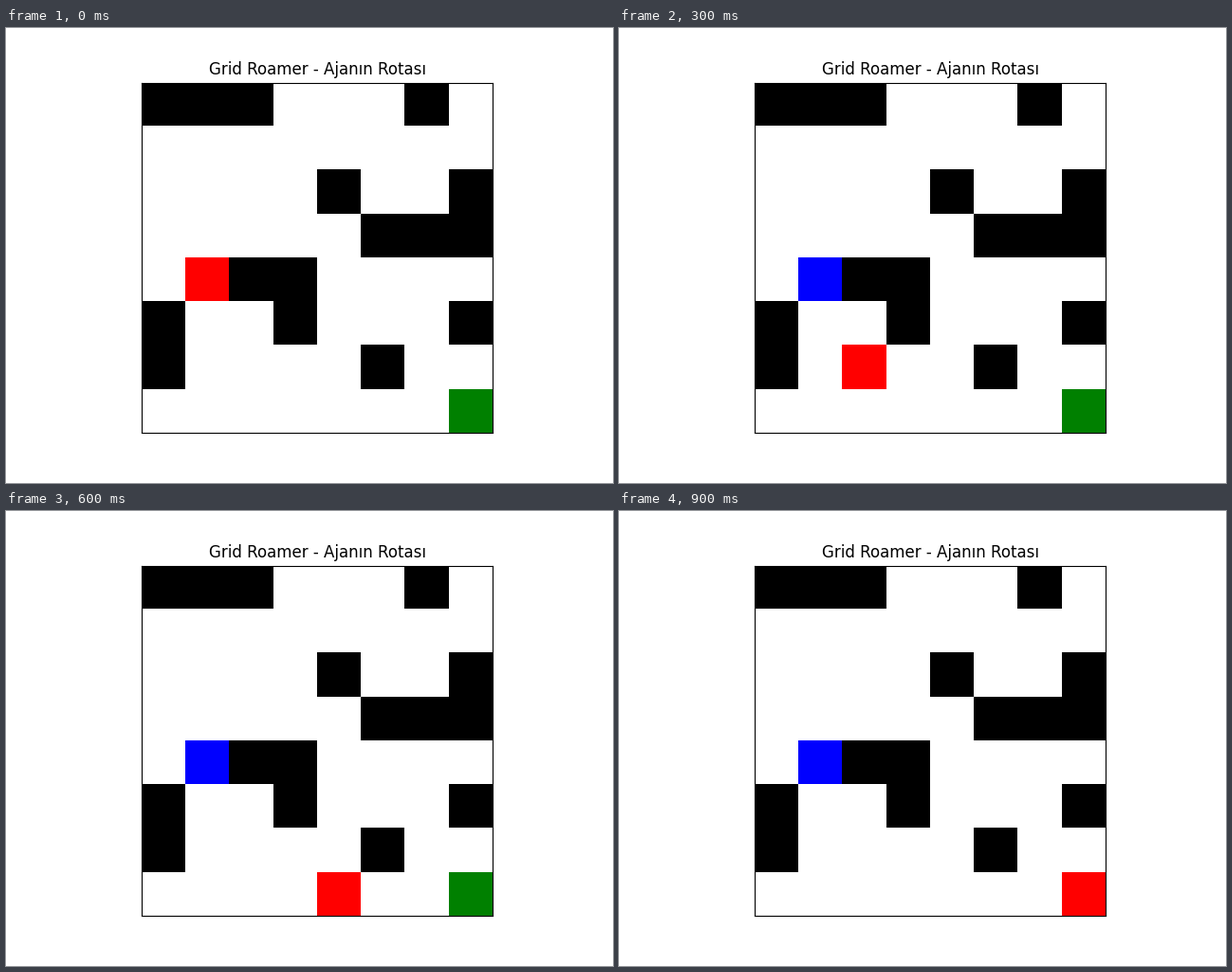
A matplotlib script that plays this animation: 640x480 px, repeating every 1000 ms.

```python
import matplotlib.pyplot as plt
import numpy as np
from matplotlib.animation import FuncAnimation
from matplotlib.colors import ListedColormap

MAZE = [
    "###...#.",
    "........",
    "....#..#",
    ".....###",
    "..##....",
    "#..#...#",
    "#....#..",
    "........",
]
START, GOAL = (4, 1), (7, 7)
MOVES = "DDRRRDRRR"
COLORS = ListedColormap(["white", "black", "blue", "green", "red"])
BLUE, GREEN, RED = 2, 3, 4


def walk(start, moves):
    """List every cell visited, start included."""
    path = [start]
    for move in moves:
        row, col = path[-1]
        path.append((row + 1, col) if move == "D" else (row, col + 1))
    return path


def grid_at(step):
    grid = np.array([[int(c == "#") for c in row] for row in MAZE])
    grid[START] = BLUE
    grid[GOAL] = GREEN
    grid[path[step]] = RED
    return grid


path = walk(START, MOVES)

plt.rcParams["font.family"] = "DejaVu Sans"
fig, ax = plt.subplots(figsize=(6.4, 4.8), dpi=100)
image = ax.imshow(grid_at(0), cmap=COLORS, vmin=0, vmax=4,
                  interpolation="nearest")
ax.set_xticks([])
ax.set_yticks([])
ax.set_title("Grid Roamer - Ajanın Rotası")


def update(step):
    image.set_data(grid_at(step))
    return [image]


anim = FuncAnimation(fig, update, frames=len(path), interval=100, repeat=True,
                     repeat_delay=0)
plt.show()
```
